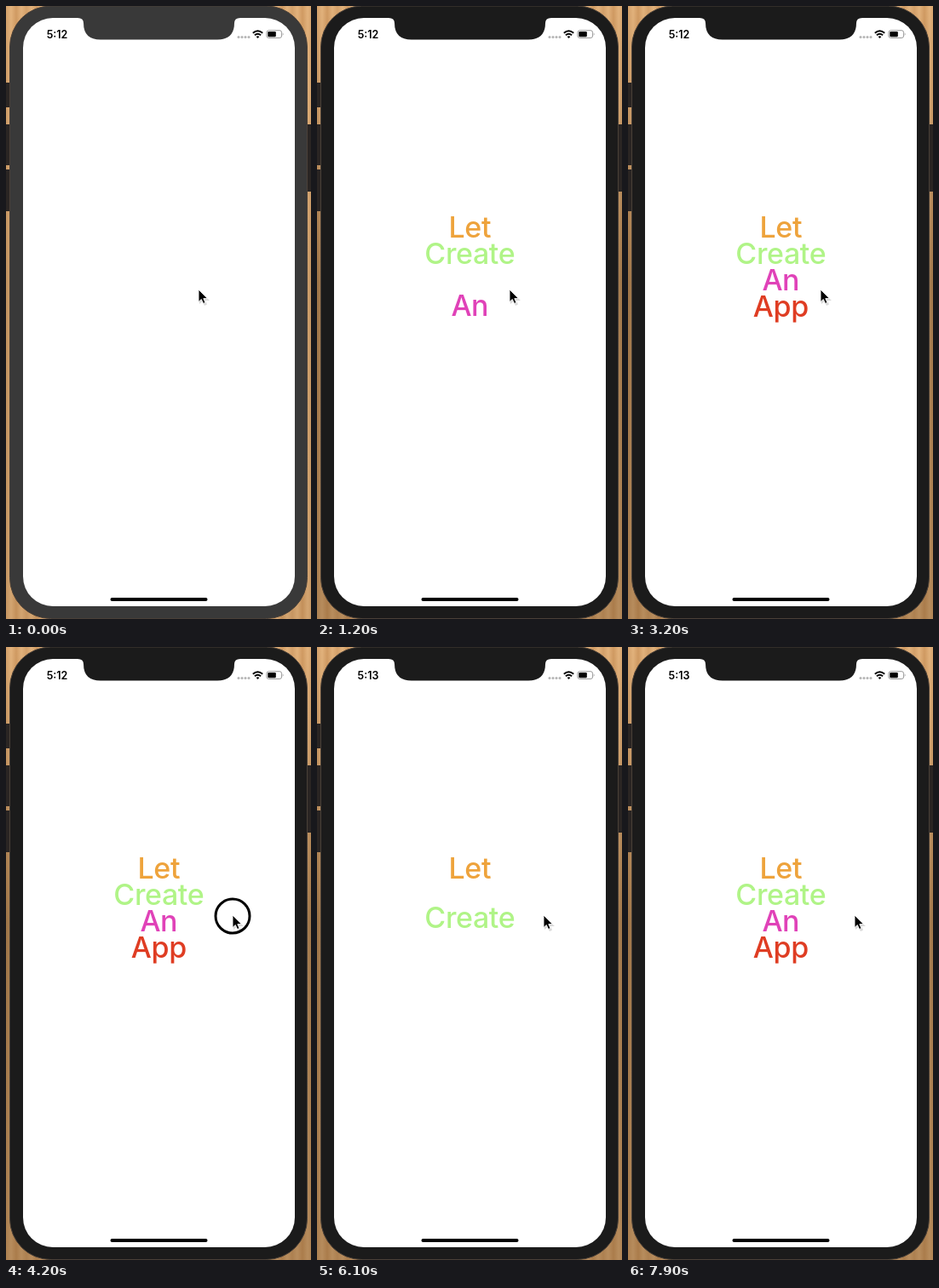
Recreate the animation shown at these times as an HTML page. Size 358x720 px, loop 8 s.

```html
<!DOCTYPE html>
<html>
<head>
<meta charset="utf-8">
<style>
html, body { margin: 0; height: 100%; overflow: hidden; background: #d3a06a; }
svg { display: block; width: 358px; height: 720px; }
text { font-family: Inter, Roboto, sans-serif; }
#words text { font-size: 34px; font-weight: 500; letter-spacing: -.4px; text-anchor: middle; }
</style>
</head>
<body>
<svg viewBox="0 0 358 720">
  <defs>
    <linearGradient id="wood" x2="12" gradientUnits="userSpaceOnUse" spreadMethod="reflect">
      <stop stop-color="#d3a06a"/><stop offset=".5" stop-color="#e2b27c"/><stop offset="1" stop-color="#d09a62"/>
    </linearGradient>
    <linearGradient id="shade" x2="0" y2="1">
      <stop stop-color="#543616" stop-opacity="0"/><stop offset=".2" stop-color="#543616" stop-opacity=".15"/>
      <stop offset=".45" stop-color="#543616" stop-opacity=".42"/><stop offset="1" stop-color="#543616" stop-opacity=".3"/>
    </linearGradient>
    <clipPath id="screen"><rect x="20" y="14" width="319" height="691" rx="35"/></clipPath>
  </defs>
  <rect width="358" height="720" fill="url(#wood)"/>
  <rect id="shadow" width="358" height="720" fill="url(#shade)"/>
  <g fill="#2a2523">
    <rect x="-2" y="90" width="9" height="29" rx="2"/>
    <rect x="-2" y="139" width="9" height="48" rx="2"/>
    <rect x="-2" y="192" width="9" height="49" rx="2"/>
    <rect x="351" y="139" width="9" height="79" rx="2"/>
  </g>
  <rect class="body" x="4.5" y="0" width="349" height="719.5" rx="48" stroke="#4a4038"/>
  <g clip-path="url(#screen)">
    <rect x="20" y="14" width="319" height="691" fill="#fff"/>
    <g id="words"></g>
  </g>
  <path class="body" d="M84 13H275V14Q268 14 268 20Q268 39.500 248 39.500H111Q91 39.500 91 20Q91 14 84 14Z"/>
  <text id="clock" x="60" y="37.700" font-size="12.500" font-weight="600" text-anchor="middle"></text>
  <g fill="#b5b5b5">
    <circle cx="273" cy="36.500" r="1.500"/><circle cx="277" cy="36.500" r="1.500"/>
    <circle cx="281" cy="36.500" r="1.500"/><circle cx="285" cy="36.500" r="1.500"/>
  </g>
  <g fill="none" stroke="#000" stroke-width="1.900">
    <path d="M289.800 31.800Q295.500 26.500 301.200 31.800M291.900 34.300Q295.500 31 299.100 34.300"/>
    <path d="M295.500 38L293.600 36Q295.500 34.500 297.400 36Z" fill="#000" stroke="none"/>
  </g>
  <rect x="305.900" y="28.700" width="17.700" height="8.800" rx="2.500" fill="none" stroke="#999"/>
  <rect x="307.300" y="30" width="9.500" height="6.200" rx="1.200"/>
  <path d="M324.800 31.500Q326.500 33 324.800 34.700Z" fill="#888"/>
  <rect x="122.500" y="695" width="114" height="4" rx="2"/>
  <circle id="tap" cx="266" cy="316" r="20" fill="none" stroke="#000" stroke-width="3"/>
  <g id="cursor">
    <path d="M1 2V17L4.500 14L7 19L10 17.500L8 13H13Z" fill="#000" opacity=".15"/>
    <path d="M0 0V14.500L3.300 11.500L5.600 16.500L8 15.400L5.800 10.600H10.500Z" stroke="#fff" stroke-width=".9"/>
  </g>
</svg>
<script>
const $ = id => document.getElementById(id);
const LOOP = 8000, RISE = 691, RATE = 0.0135, GAP = 459.5;

const words = [["Let", "#eea33c"], ["Create", "#b0f487"], ["An", "#e042b8"], ["App", "#df3d23"]].map(([label, color]) => {
  const el = document.createElementNS("http://www.w3.org/2000/svg", "text");
  el.textContent = label;
  el.setAttribute("x", 179.3);
  el.setAttribute("fill", color);
  $("words").append(el);
  return el;
});

// Remaining distance of a critically damped spring
function offset(ms) {
  const x = RATE * Math.max(0, ms);
  return RISE * (1 + x) * Math.exp(-x);
}

const show = (el, on) => el.setAttribute("visibility", on ? "visible" : "hidden");

function draw(t) {
  const start = t < 4300 ? -81 : 5268;
  words.forEach((el, i) => el.setAttribute("y", 272 + 31 * i + offset(t - start - i * GAP)));

  const active = t >= 100;
  document.querySelectorAll(".body").forEach(el => el.setAttribute("fill", active ? "#1b1b1b" : "#393939"));
  $("shadow").setAttribute("opacity", active ? 1 : 0.35);
  $("clock").textContent = t < 5000 ? "5:12" : "5:13";

  const p = Math.min(1, Math.max(0, (t - 3650) / 450));
  const e = p * p * (3 - 2 * p);
  $("cursor").setAttribute("transform", `translate(${226 + 40 * e} ${333 - 18 * e})`);
  show($("tap"), (t >= 4100 && t < 4300) || (t >= 5000 && t < 5200));
}

const begin = performance.now();
function tick() {
  draw((performance.now() - begin) % LOOP);
  requestAnimationFrame(tick);
}
tick();
</script>
</body>
</html>
```
